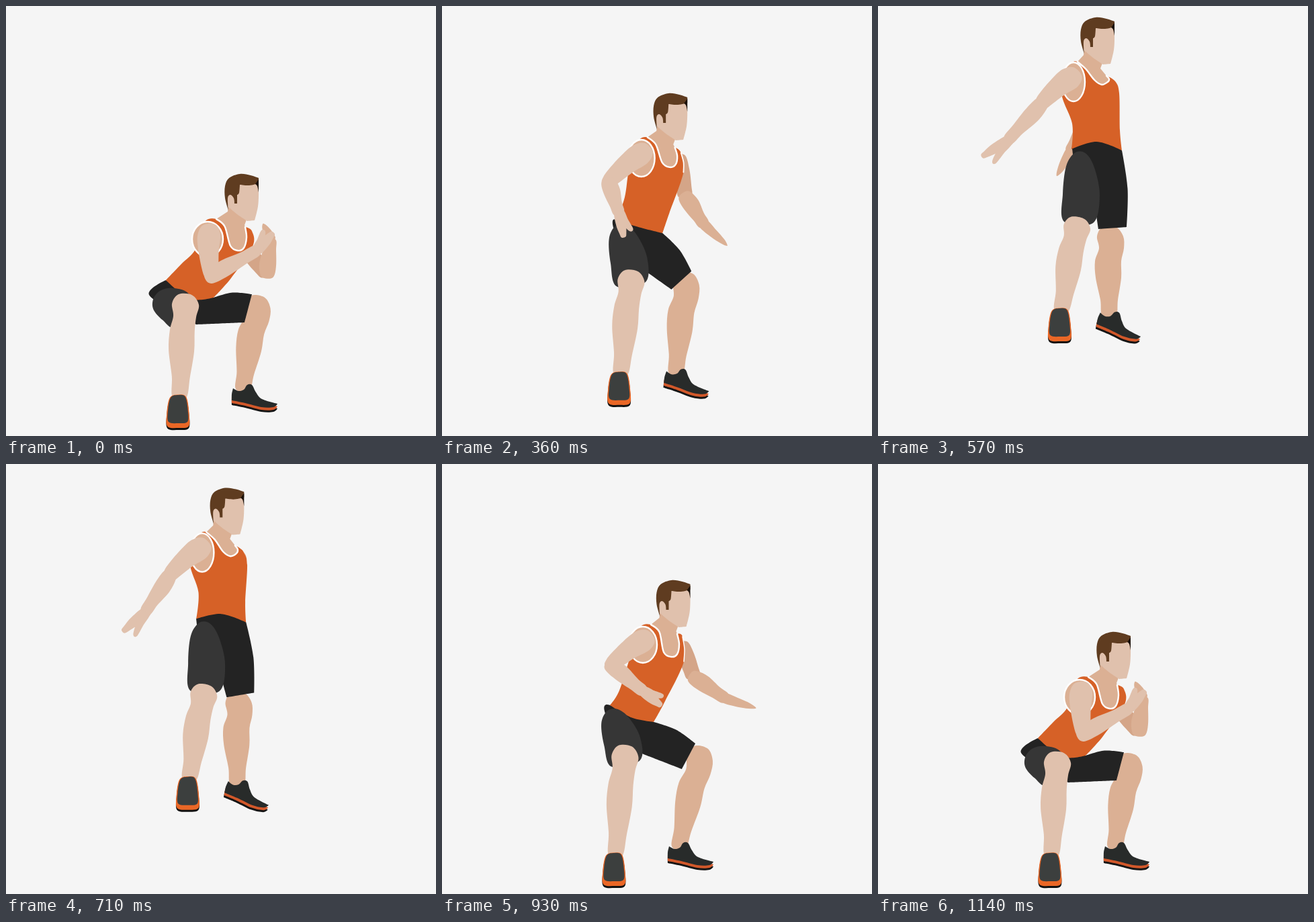
An HTML page with a canvas that plays this animation: 640x640 px, repeating every 1280 ms.

```html
<!DOCTYPE html>
<html lang="en">
<head>
<meta charset="utf-8">
<title>Squat jump</title>
<style>
html, body { margin: 0; width: 100%; height: 100%; overflow: hidden; background: #f5f5f5; }
canvas { display: block; width: 640px; height: 640px; }
</style>
</head>
<body>
<canvas id="stage" width="640" height="640"></canvas>
<script>
const ctx = document.getElementById('stage').getContext('2d');

const LIGHT = '#e0c1ad', MID = '#dbb094', DEEP = '#d4a588', ORANGE = '#d66127',
      BLACK = '#232323', GREY = '#363636', HAIR = '#5f3c20';

// Height of the jump (0 squat, 1 top) from each moment of the loop
const LOOP = 1280;
const STEPS = [
  [0, 0], [140, .1], [210, .249], [290, .385], [360, .515], [430, .652], [500, .83], [570, 1],
  [710, .92], [790, .781], [860, .56], [930, .33], [1000, .16], [1070, .05], [1140, 0]
];

// Joints at four levels: squat, rising, take-off, top
const LEVELS = [0, .33, .652, 1];
const JOINTS = {
  head:        '0,0 -6.5,-77 -14,-152 -24,-233',
  strap:       '313,317 311,239 302,163 297,83',
  collar:      '345,364 341,287 337,205 333,117',
  farStrap:    '356,329 350,253 344,179 340,104',
  farSide:     '366,335 358,257 354,190 353,112',
  chest:       '367,358 360,294 359,213 359,130',
  belly:       '335,405 332,353 343,275 360,185',
  waistFront:  '309,434 315,384 338,304 363,215',
  waistBack:   '238,408 250,359 267,289 288,213',
  back:        '261,384 264,337 278,245 289,175',
  shoulder:    '300,347 299,269 295,195 291,113',
  farShoulder: '358,362 361,275 352,202 340,125',
  hip:         '226,428 255,366 277,297 303,219',
  hem:         '265,462 273,446 287,391 298,322',
  crotch:      '283,474 295,430 311,370 324,305',
  hemIn:       '355,471 357,454 330,398 328,332',
  hemOut:      '366,429 377,416 367,379 370,329',
  knee:        '267,428 273,418 289,374 298,314',
  farKnee:     '376,428 387,417 347,375 344,325',
  // angle and length of upper arm, forearm, hand
  arm:    '86,61,-30,79,-47,34 142,60,38,63,40,33 136,66,94,39,110,38 138,58,132,74,149,45',
  farArm: '50,48,-85,52,-115,25 72,45,33,57,18,46 91,56,72,46,61,44 121,55,119,52,120,40'
};

// Half widths on both sides at a fraction of the bone
const CALF = [[0, 10, 10], [.2, 14, 13], [.45, 18, 20], [.64, 17, 20], [.78, 18, 16], [.9, 21, 19], [.99, 10, 10]];
const FAR_CALF = [[0, 10, 10], [.18, 13, 13], [.42, 18, 20], [.6, 18, 21], [.74, 22, 15], [.87, 21, 18], [.97, 10, 10]];
const THIGH = [[0, 10, 6], [.2, 22, 20], [.6, 25, 30], [1, 21, 22]];
const UPPER = [[-.25, 8, 10], [0, 17, 17], [.4, 17, 13], [.8, 14, 11], [1, 11, 10], [1.12, 6, 6]];
const FAR_UPPER = [[-.2, 7, 7], [.2, 12, 11], [.7, 12, 11], [1, 9, 9]];
const FOREARM = [[-.12, 6, 6], [0, 11, 11], [.3, 12, 13], [.7, 10, 9], [1, 8, 7]];
const PALM = [[-.1, 7, 7], [.45, 8, 7], [.85, 5, 5], [1, 3, 3]];
const THUMB = [[0, 7, 7], [.5, 6, 5], [1, 3, 3]];
const FLAT_HAND = [[-.1, 7, 7], [.4, 7, 6], [.8, 4, 4], [1, 1, 1]];

const pairs = text => text.trim().split(/\s+/).map(p => p.split(',').map(Number));
const TRACKS = Object.entries(JOINTS).map(([name, text]) => [name, pairs(text)]);

const FACE = pairs('346,262 374,262 376,275 375,298 370,319 359,320 344,310 331,299 330,284');
const HAIRCUT = pairs(`331,304 326,286 326,268 332,256 348,250 364,252 376,256 376,264 362,267
  348,266 347,278 344,281 344,294 340,294 339,286 334,281 330,286`);
const WEDGE = pairs('371,265 376,258 376,277 374,268');
const NAPE = pairs('355,326 358,318 350,290 331,296 330,306');
const NEAR_SHOE = pairs('245,583 256,579 267,582 271,605 270,619 257,621 242,619 241,603');
const FAR_SHOE = pairs('338,569 346,573 354,571 359,564 366,564 372,575 381,585 404,592 398,597 380,597 356,591 336,587 336,578');

const clamp = v => Math.max(0, Math.min(1, v));
const mix = (a, b, k) => a.map((v, i) => v + (b[i] - v) * k);
const add = ([x, y], dx, dy) => [x + dx, y + dy];
const polar = ([x, y], deg, len) =>
  [x + len * Math.cos(deg * Math.PI / 180), y + len * Math.sin(deg * Math.PI / 180)];

function poseAt(s) {
  let i = 0;
  while (i < LEVELS.length - 2 && s > LEVELS[i + 1]) i++;
  const k = (s - LEVELS[i]) / (LEVELS[i + 1] - LEVELS[i]);
  return Object.fromEntries(TRACKS.map(([name, keys]) => [name, mix(keys[i], keys[i + 1], k)]));
}

// Smooth curve through the points; tangents vanish at corners
function trace(p, corners = [], closed = true) {
  const n = p.length;
  const wrap = i => closed ? (i + n) % n : Math.max(0, Math.min(n - 1, i));
  const at = i => p[wrap(i)];
  const handle = (i, sign) => {
    const k = corners.includes(wrap(i)) ? 0 : sign / 6;
    return at(i).map((v, d) => v + k * (at(i + 1)[d] - at(i - 1)[d]));
  };
  ctx.beginPath();
  ctx.moveTo(...p[0]);
  for (let i = 0; i < (closed ? n : n - 1); i++) {
    ctx.bezierCurveTo(...handle(i, 1), ...handle(i + 1, -1), ...at(i + 1));
  }
  if (closed) ctx.closePath();
}

function fill(color) {
  ctx.fillStyle = color;
  ctx.fill();
}

function line(width) {
  ctx.strokeStyle = '#fff';
  ctx.lineWidth = width;
  ctx.stroke();
}

function shape(p, color, corners) {
  trace(p, corners);
  fill(color);
}

function limb(a, b, widths, color) {
  const dx = b[0] - a[0], dy = b[1] - a[1], len = Math.hypot(dx, dy);
  const side = (u, w) => [a[0] + dx * u - dy / len * w, a[1] + dy * u + dx / len * w];
  const one = widths.map(([u, w]) => side(u, w));
  const two = widths.map(([u, , w]) => side(u, -w)).reverse();
  shape([...one, ...two], color);
}

function moved([x, y], paint) {
  ctx.save();
  ctx.translate(x, y);
  paint();
  ctx.restore();
}

function farArm(p) {
  const [a, la, b, lb, c, lc] = p.farArm;
  const elbow = polar(p.farShoulder, a, la), wrist = polar(elbow, b, lb);
  limb(p.farShoulder, elbow, FAR_UPPER, DEEP);
  limb(elbow, wrist, FOREARM, MID);
  limb(wrist, polar(wrist, c, lc), FLAT_HAND, MID);
}

function nearArm(p, s) {
  const [a, la, b, lb, c, lc] = p.arm;
  const top = add(p.shoulder, 2 - 7 * s, -6);
  const elbow = polar(top, a, la), wrist = polar(elbow, b, lb);
  limb(top, elbow, UPPER, LIGHT);
  limb(elbow, wrist, FOREARM, LIGHT);
  limb(wrist, polar(wrist, c, lc), PALM, LIGHT);
  limb(wrist, polar(wrist, c - 26, lc * .85), THUMB, LIGHT);
}

function farShoe(ankle, tilt) {
  moved(ankle, () => {
    ctx.rotate(.2 * tilt);
    for (const [drop, color] of [[7, '#151515'], [4, '#d2582a'], [0, '#282b2a']]) {
      moved([-352, drop - 572], () => shape(FAR_SHOE, color, [0, 7, 11]));
    }
  });
}

function nearShoe() {
  const rim = NEAR_SHOE.map(([x, y]) => [256 + (x - 256) * 1.12, 582 + (y - 582) * 1.18]);
  moved([0, 3], () => shape(rim, '#111'));
  shape(rim, '#ea6726');
  shape(NEAR_SHOE, '#3c3f3e');
}

function shorts(p, dip) {
  const [x, y] = mix(p.waistFront, p.hemOut, .5);
  const dx = p.hemOut[0] - p.waistFront[0], dy = p.hemOut[1] - p.waistFront[1];
  const len = Math.hypot(dx, dy);
  const bulge = [x + 5 * dy / len, y - 5 * dx / len];
  shape([p.waistBack, add(p.hip, -13, 2), p.hem, p.crotch, p.hemIn, p.hemOut, bulge,
    p.waistFront, add(dip, 0, -8)], BLACK, [0, 3, 4, 5, 7]);
}

function vest(p, s, dip) {
  shape([p.strap, add(p.shoulder, -4, -26), add(p.shoulder, -18, 15), p.back, p.waistBack, dip,
    p.waistFront, p.belly, p.chest, p.farSide, p.farStrap], ORANGE, [0, 4, 6, 10]);

  // far strap shows its edge only in mid-swing
  const edge = 1.8 * Math.sin(Math.PI * s);
  if (edge > .1) {
    trace([p.farSide, add(mix(p.farSide, p.chest, .5), 2, 0), p.chest], [], false);
    line(edge);
  }

  const u = p.collar, right = add(u, 9, -4);
  const neckline = [p.strap, add(p.strap, 12.5, 11), add(u, -11, -7), u, right,
    add(mix(right, p.farStrap, .5), 3, 0), p.farStrap];
  trace(neckline, [], false);
  for (const q of NAPE) ctx.lineTo(...add(q, ...p.head));
  ctx.closePath();
  fill(MID);
  trace(neckline, [], false);
  line(2.4);

  ctx.beginPath();
  ctx.ellipse(...p.shoulder, 23 - 6 * s, 26 + 3 * s, 0, 0, 2 * Math.PI);
  fill(MID);
  line(2.4);
}

function headShape() {
  shape(FACE, LIGHT, [0, 1, 4, 5, 7]);
  shape(HAIRCUT, HAIR, [0, 6, 7, 9, 11, 12, 13]);
  shape(WEDGE, '#1b1008', [0, 1, 2]);
}

function draw(s) {
  const p = poseAt(s);
  const lift = clamp((s - .34) / .66), tilt = clamp(2 * lift);
  const step = [14.5 * tilt, -129 * lift];
  const ankle = add([258, 583], ...step);
  const farAnkle = [352 - 8 * tilt, 572 - 129 * lift + 19 * tilt];
  const dip = add(mix(p.waistBack, p.waistFront, .5), 0, 15 - 27 * s);

  ctx.fillStyle = '#f5f5f5';
  ctx.fillRect(0, 0, 640, 640);
  ctx.lineCap = ctx.lineJoin = 'round';

  farArm(p);
  limb(farAnkle, p.farKnee, FAR_CALF, MID);
  farShoe(farAnkle, tilt);
  shorts(p, dip);
  vest(p, s, dip);
  limb(p.hip, p.hem, THIGH, GREY);
  limb(ankle, p.knee, CALF, LIGHT);
  moved(step, nearShoe);
  nearArm(p, s);
  moved(p.head, headShape);
}

const start = performance.now();

function tick() {
  const t = (performance.now() - start) % LOOP;
  draw(STEPS.filter(([from]) => from <= t).pop()[1]);
  requestAnimationFrame(tick);
}
tick();
</script>
</body>
</html>
```
